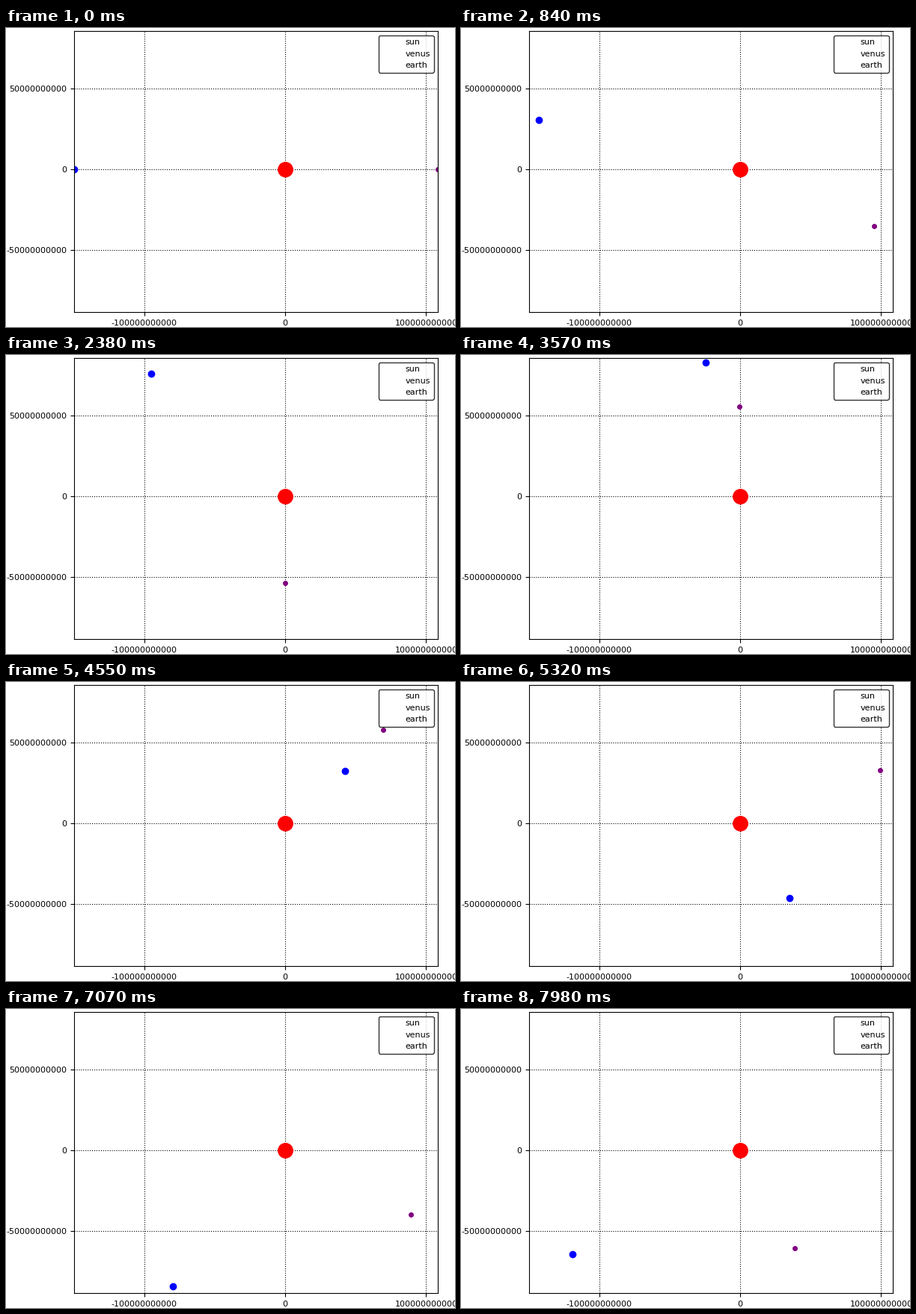
A matplotlib script that plays this animation: 600 by 400 pixels, repeating every 8 s.

```python
import numpy as np
import matplotlib.pyplot as plt
from matplotlib.animation import FuncAnimation
from matplotlib.lines import Line2D

W, H, DPI = 600, 400, 100
LOOP, INTERVAL, STEP_MS = 8000, 20, 70
STEPS = 115
DAY = 86400.0
MU = 2 * 6.674e-11 * 1.989e30


def orbit(x, vy):
    """Daily positions on an orbit around the origin, semi-implicit Euler."""
    pos, vel = np.array([x, 0.0]), np.array([0.0, vy])
    path = [pos]
    for _ in range(STEPS - 1):
        vel = vel - MU * pos / np.hypot(*pos) ** 3 * DAY
        pos = pos + vel * DAY
        path.append(pos)
    return np.array(path)


venus_path = orbit(1.082e11, -35000.0)
earth_path = orbit(-1.496e11, 29780.0)

plt.rcParams["font.family"] = "DejaVu Sans"
plt.rcParams["font.size"] = 8

fig = plt.figure(figsize=(W / DPI, H / DPI), dpi=DPI, facecolor="white")
ax = fig.add_axes([91.1 / W, 20 / H, 486 / W, 376 / H])
ax.set_xlim(-1.496e11, 1.0835e11)
ax.set_ylim(-0.8818e11, 0.8541e11)
ax.set_xticks([-1e11, 0, 1e11])
ax.set_yticks([-5e10, 0, 5e10])
for axis in (ax.xaxis, ax.yaxis):
    axis.set_major_formatter(lambda v, _: f"{v:.0f}")
ax.grid(color="black", linestyle=":", linewidth=0.8)


def body(start, color, size):
    return ax.plot([start[0]], [start[1]], "o", color=color, markersize=size)[0]


body((0, 0), "red", 14)
venus = body(venus_path[0], "purple", 4)
earth = body(earth_path[0], "blue", 6)

blank = [Line2D([], [], linestyle="none") for _ in range(3)]
ax.legend(blank, ["sun", "venus", "earth"], loc="upper right",
          fontsize=8, edgecolor="black")


def update(i):
    day = min((i * INTERVAL + INTERVAL // 2) // STEP_MS, STEPS - 1)
    for dot, path in ((venus, venus_path), (earth, earth_path)):
        dot.set_data([path[day, 0]], [path[day, 1]])
    return venus, earth


anim = FuncAnimation(fig, update, frames=LOOP // INTERVAL, interval=INTERVAL,
                     repeat=True, repeat_delay=0, blit=False)
plt.show()
```
